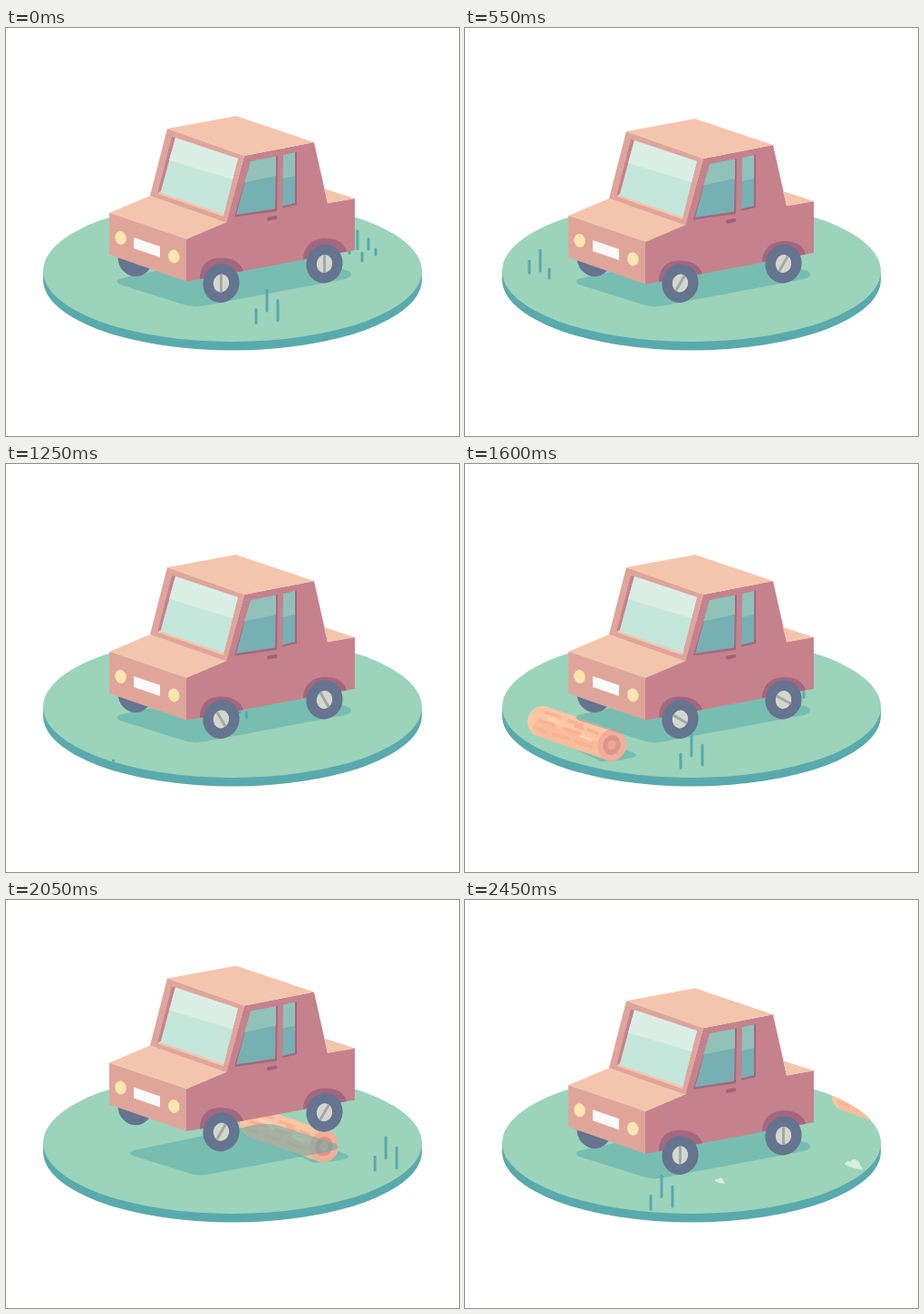
Animation, 500 px wide and 450 px high, one loop 2.5 s. Source, as an HTML page:

```html
<!DOCTYPE html>
<html lang="en">
<head>
<meta charset="utf-8">
<title>Little car</title>
<style>
  html, body { margin: 0; width: 100%; height: 100%; overflow: hidden; background: #fff; }
  svg { display: block; width: 500px; height: 450px; }
  .grass { fill: none; stroke: #57a9ab; stroke-width: 3; stroke-linecap: round; }
  .tire { fill: #65748f; }
  .light { fill: #f4c5ad; }
  .front { fill: #dfa59b; }
  .side { fill: #c6828c; }
  .dark { fill: #a4677f; }
  .lamp { fill: #fbe6b0; }
  .hub { fill: #d3d7cd; }
  .spoke { stroke: #a3a8a6; stroke-width: 3; }
</style>
</head>
<body>
<svg viewBox="0 0 500 450">
  <defs>
    <clipPath id="top"><ellipse cx="250" cy="268" rx="209" ry="78"/></clipPath>
    <clipPath id="hubClip"><ellipse rx="8.7" ry="10"/></clipPath>
    <path id="trio" d="M-12 23V38M0 1.5V24.5M12 13V35"/>
    <path id="five" d="M-9 16.5V26M0 1.5V21M5 25.5V34.5M12 10.5V21.5M20 21.5V27.5"/>
    <path id="far" d="M-12 13.5V26.5M0 1.5V24.5M10 22.5V32.5"/>
    <path id="puff" d="M-10 -2Q-7 -7 -3 -5Q0 -10 5 -6Q8 -3 7 -1Q10 0 10 4Q0 3 -10 -2Z" fill="#d3efe0"/>
    <g id="wheel">
      <ellipse class="tire" rx="20" ry="21.5" transform="rotate(15)"/>
      <g transform="rotate(8)"><ellipse class="hub" rx="8.7" ry="10"/></g>
      <g clip-path="url(#hubClip)"><path class="spoke" d="M0 -11V11"/></g>
    </g>
  </defs>

  <path fill="#59aaac" d="M41 268V277.500A209 78 0 0 0 459 277.500V268Z"/>
  <ellipse cx="250" cy="268" rx="209" ry="78" fill="#9cd3bb"/>

  <g clip-path="url(#top)">
    <g id="log">
      <path d="M90 299L150 328Q170 328 188 323Q192 320 182 317L160 308Z" fill="#57a7a8" opacity=".5"/>
      <path d="M86 284L161 310" stroke="#fdc6a2" stroke-width="34" stroke-linecap="round"/>
      <path d="M74 291Q76 297 81 300L156 326L161 311L78 283Z" fill="#f9bc9b"/>
      <path d="M89 274L105 279M114 283L129 288M82 283L98 288M109 292L126 297M136 293L146 297M80 292L88 295M98 298L114 303M122 306L140 312M122 289L130 292"
            fill="none" stroke="#f7b293" stroke-width="3.500" stroke-linecap="round"/>
      <path d="M92 281L103 285M128 300L139 304" stroke="#ffd3b0" stroke-width="3" stroke-linecap="round"/>
      <g transform="translate(162 310) rotate(15)">
        <ellipse rx="15.500" ry="18" fill="#f2ae98"/>
        <ellipse rx="9.500" ry="11" fill="#df9488"/>
        <ellipse rx="4.500" ry="5.500" fill="#eda696"/>
      </g>
    </g>
    <path id="shadow" fill="#57a7a8" opacity=".5"
          d="M128 276Q118 279 126 283L193 304Q206 309 220 306L374 277Q386 273 378 268L306 245Q293 242 280 244Z"/>
    <g id="grass" class="grass"></g>
    <use id="puffFront" href="#puff"/>
    <use id="puffRear" href="#puff"/>
  </g>

  <g id="wheelFar"><ellipse class="tire" cx="143" cy="253" rx="19.500" ry="21"/></g>
  <g id="body">
    <path class="side" d="M263 141L340 126L355 193L385 188V245L262 268L214 277L199 279.500V233L243 214Z"/>
    <path class="light" d="M351 177L385 188L355 193.500Z"/>
    <path class="light" d="M178 111L254 97L340 126L263 141Z"/>
    <path class="light" d="M159 185L244 214L199 233L114 204Z"/>
    <path class="front" d="M178 111L263 141L243.500 214.500L159 185Z"/>
    <path class="front" d="M114 204L199 233V279.500L114 250Z"/>

    <path class="side" d="M183 120L187 121L171 182L167.500 181Z"/>
    <path class="light" d="M170 180L241 204L240 208L168 183Z"/>
    <path fill="#c4e6db" d="M187 121L256 144L240.500 205.500L170.500 181.500Z"/>
    <path fill="#daeee6" d="M187 121L256 144L250 167L180 146Z"/>

    <path class="dark" d="M270 147L300 141L299 202L252 208.500Z"/>
    <path fill="#77b0b2" d="M270 147L298 141.500L297 199.500L254 206Z"/>
    <path fill="#91c1b8" d="M270 147L298 141.500V163L263 170.500Z"/>
    <path class="dark" d="M306 140L321 136.500V195L305 198.500Z"/>
    <path fill="#77b0b2" d="M306 140L319 137V193L305 196.500Z"/>
    <path fill="#91c1b8" d="M306 140L319 137V163L305.500 166Z"/>
    <path d="M290 210.500L297.500 209" stroke="#a0627b" stroke-width="4" stroke-linecap="round"/>

    <path class="dark" d="M214 277C214 262 222 253.500 237 253.500C251 253.500 259 259 262 268Z"/>
    <path class="dark" d="M328 255C328 241 338 232 352 232C366 232 374 238 376 246.500Z"/>

    <ellipse class="lamp" cx="126.500" cy="231.500" rx="6.200" ry="7.500" transform="rotate(-12 126.500 231.500)"/>
    <ellipse class="lamp" cx="185.300" cy="252" rx="6.200" ry="7.500" transform="rotate(-12 185.300 252)"/>
    <path fill="#fafafa" d="M141 231L170 241V253L141 243Z"/>
  </g>
  <g id="wheels">
    <use href="#wheel" x="237.500" y="281.500"/>
    <use href="#wheel" x="351.500" y="260"/>
  </g>
</svg>
<script>
const LOOP = 2500, STEP = 50;
const JUMP = { peak: 1910, half: 201, height: 50 };
const LANDING = JUMP.peak + JUMP.half;
const $ = id => document.getElementById(id);
const move = (el, x, y, rest = '') => el.setAttribute('transform', `translate(${x} ${y}) ${rest}`);

// Each tuft is at (x, y) at time t and drifts at its row's speed and slope.
const rows = {
  trio: { speed: .376, slope: -.217 },
  five: { speed: .31, slope: -.2075 },
  far: { speed: .3, slope: -.21 },
};
const tufts = [
  ['far', 550, 83, 243.5],
  ['five', 0, 388, 222.5],
  ['five', 900, 137, 275],
  ['trio', 0, 288, 287.5],
  ['trio', 1600, 250, 297],
  ['trio', 2450, 217, 303],
].map(([kind, t, x, y]) => {
  const el = document.createElementNS('http://www.w3.org/2000/svg', 'use');
  el.setAttribute('href', '#' + kind);
  $('grass').append(el);
  return { el, t, x, y, ...rows[kind] };
});

const spokes = document.querySelectorAll('.spoke');

function puff(el, x, y, age) {
  const a = Math.max(0, age);
  move(el, x + .226 * a, y + .04 * a, `scale(${a / 339})`);
}

function draw(t) {
  for (const g of tufts) {
    const dx = g.speed * (t - g.t);
    move(g.el, g.x + dx, g.y + g.slope * dx);
  }

  const late = Math.max(0, t - 2050);
  const logX = .42 * (t - 1600) - .053 * late;
  move($('log'), logX, -.203 * logX);

  const lift = JUMP.height * Math.max(0, 1 - ((t - JUMP.peak) / JUMP.half) ** 2);
  const bob = 1.5 * (1 - Math.cos(2 * Math.PI * t / 355));
  const size = 1 - .2 * lift / 45.5;
  move($('body'), 0, bob - lift);
  move($('wheels'), 0, -lift);
  move($('wheelFar'), 0, -lift);
  move($('shadow'), 252, 275, `scale(${size}) translate(-252 -275)`);

  const spin = -.6 * t + .075 * late;
  spokes.forEach(s => s.setAttribute('transform', `rotate(${spin})`));

  puff($('puffRear'), 352, 280, t - LANDING);
  puff($('puffFront'), 237, 303, t - LANDING - 144);
}

const start = performance.now();
function tick() {
  const t = (performance.now() - start) % LOOP;
  draw(Math.floor(t / STEP) * STEP);
  requestAnimationFrame(tick);
}
tick();
</script>
</body>
</html>
```
